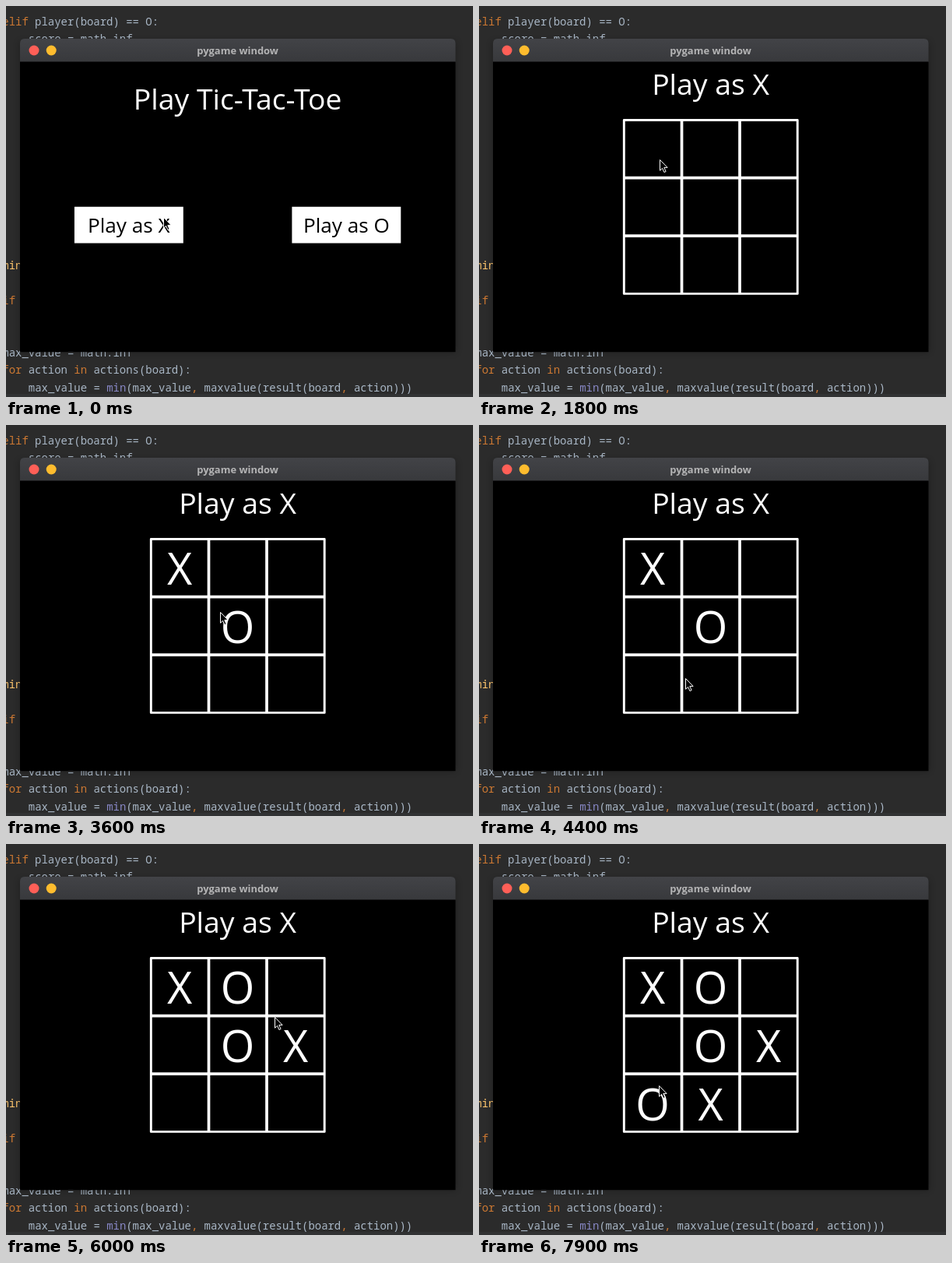
Recreate the animation shown at these times as an HTML page. Size 600x502 px, loop 8000 ms.

```html
<!DOCTYPE html>
<html lang="en">
<head>
<meta charset="utf-8">
<title>Tic-Tac-Toe</title>
<style>
html, body { margin: 0; width: 100%; height: 100%; overflow: hidden; background: #2b2b2b; }
svg { display: block; width: 600px; height: 502px; }

.code { font: 13.95px "Noto Sans Mono", "DejaVu Sans Mono", monospace; fill: #a9b7c6; }
.code text { white-space: pre; }
.kw { fill: #cc7832; }
.fn { fill: #ffc66d; }
.builtin { fill: #8888c6; }

.bar { font: bold 12.95px "Open Sans", "Noto Sans", sans-serif; fill: #b4b4b5; text-anchor: middle; }
.game { font-family: "Open Sans", "Noto Sans", sans-serif; fill: #fff; text-anchor: middle; }
.title { font-size: 37.3px; }
.button { font-size: 26.1px; fill: #000; }
.mark { font-size: 55.9px; }

/* Shared 8 s timeline: 1% = 80 ms */
.on { animation: 8s step-end infinite; }
.menu { animation-name: menu; }
.board { animation-name: board; }
.turn { animation-name: turn; }
.think { animation-name: think; }
.m1 { animation-name: m1; }
.m2 { animation-name: m2; }
.m3 { animation-name: m3; }
.m4 { animation-name: m4; }
.m5 { animation-name: m5; }
.m6 { animation-name: m6; }
@keyframes menu { 0% { opacity: 1 } 2.5%, to { opacity: 0 } }
@keyframes board { 0% { opacity: 0 } 2.5%, to { opacity: 1 } }
@keyframes turn {
  0%, 45%, 72.5%, 92.5%, to { opacity: 1 }
  27.5%, 65%, 83.75% { opacity: 0 }
}
@keyframes think {
  0%, 45%, 72.5%, 92.5%, to { opacity: 0 }
  27.5%, 65%, 83.75% { opacity: 1 }
}
@keyframes m1 { 0% { opacity: 0 } 27.5%, to { opacity: 1 } }
@keyframes m2 { 0% { opacity: 0 } 45%, to { opacity: 1 } }
@keyframes m3 { 0% { opacity: 0 } 65%, to { opacity: 1 } }
@keyframes m4 { 0% { opacity: 0 } 72.5%, to { opacity: 1 } }
@keyframes m5 { 0% { opacity: 0 } 83.75%, to { opacity: 1 } }
@keyframes m6 { 0% { opacity: 0 } 92.5%, to { opacity: 1 } }

/* The pointer advances once every 100 ms */
.cursor { animation: cursor 8s step-end infinite; }
@keyframes cursor {
  0% { transform: translate(202px, 271px) }
  2.5% { transform: translate(202px, 272px) }
  13.75% { transform: translate(202px, 272px); animation-timing-function: steps(6) }
  21.25% { transform: translate(232px, 197px) }
  30% { transform: translate(232px, 197px); animation-timing-function: steps(3) }
  33.75% { transform: translate(268px, 224px) }
  35% { transform: translate(275px, 240px) }
  46.25% { transform: translate(275px, 240px); animation-timing-function: steps(6) }
  53.75% { transform: translate(265px, 325px) }
  56.25% { transform: translate(265px, 325px); animation-timing-function: steps(5) }
  62.5% { transform: translate(365px, 262px) }
  68.75% { transform: translate(365px, 262px); animation-timing-function: steps(3) }
  72.5% { transform: translate(345px, 222px) }
  78.75% { transform: translate(345px, 222px); animation-timing-function: steps(3) }
  82.5% { transform: translate(291px, 330px) }
  92.5% { transform: translate(291px, 330px); animation-timing-function: steps(4) }
  97.5%, to { transform: translate(231px, 310px) }
}
</style>
</head>
<body>
<svg viewBox="0 0 600 502">
  <defs>
    <linearGradient id="chrome" x2="0" y2="1">
      <stop stop-color="#424347"/>
      <stop offset="1" stop-color="#38393c"/>
    </linearGradient>
    <filter id="shade" x="-10%" y="-10%" width="120%" height="120%">
      <feGaussianBlur stdDeviation="5"/>
    </filter>
  </defs>

  <rect width="600" height="502" fill="#2b2b2b"/>
  <g class="code">
    <text x="-4.7" y="25"><tspan class="kw">elif</tspan> player(board) == O:</text>
    <text x="28.8" y="47.4">score = math.inf</text>
    <text x="-4.7" y="338.4" class="fn">min</text>
    <text x="-4.7" y="383" class="kw">if</text>
    <text x="-4.7" y="450">max_value = math.inf</text>
    <text x="-4.7" y="472.4"><tspan class="kw">for</tspan> action <tspan class="kw">in</tspan> actions(board):</text>
    <text x="28.8" y="494.8">max_value = <tspan class="builtin">min</tspan>(max_value<tspan class="kw">,</tspan> maxvalue(result(board<tspan class="kw">,</tspan> action)))</text>
  </g>
  <rect y="498" width="600" height="4" fill="#313233"/>

  <rect x="18" y="46" width="559.5" height="398" fill="#000" opacity=".3" filter="url(#shade)"/>
  <path d="M18 72V48q0-6 6-6H571.5q6 0 6 6V72z" fill="url(#chrome)"/>
  <rect x="18" y="71.5" width="559.5" height="372.7"/>
  <circle cx="36" cy="57" r="6.5" fill="#ff5f57"/>
  <circle cx="58.2" cy="57" r="6.5" fill="#febc2e"/>
  <text class="bar" x="297.6" y="62">pygame window</text>

  <g class="game">
    <g class="on menu">
      <text class="title" x="297.6" y="132.8">Play Tic-Tac-Toe</text>
      <path d="M87.9 257.8h139.9v46.6H87.9zM367.4 257.8h139.9v46.6H367.4z"/>
      <text class="button" x="157.8" y="291.2">Play as X</text>
      <text class="button" x="437.4" y="291.2">Play as O</text>
    </g>
    <g class="on board">
      <text class="title on turn" x="297.6" y="114.2">Play as X</text>
      <text class="title on think" x="297.6" y="114.2">Computer thinking...</text>
      <rect x="186.3" y="146.5" width="222.9" height="222.9" fill="none" stroke="#fff" stroke-width="2.9" stroke-linejoin="round"/>
      <path d="M260.5 146V370M335 146V370M186 220.6H410M186 295.1H410" stroke="#fff" stroke-width="3.7"/>
      <g class="mark">
        <text class="on m1" x="223.1" y="205.4">X</text>
        <text class="on m2" x="297.6" y="280">O</text>
        <text class="on m3" x="372.2" y="280">X</text>
        <text class="on m4" x="297.6" y="205.4">O</text>
        <text class="on m5" x="297.6" y="354.5">X</text>
        <text class="on m6" x="223.1" y="354.5">O</text>
      </g>
    </g>
  </g>

  <path class="cursor" d="M.5.5V14.2l3.1-2.9 2.3 5.2 2.2-1-2.3-5.1h4.3z" stroke="#fff" stroke-linejoin="round"/>
</svg>
</body>
</html>
```
